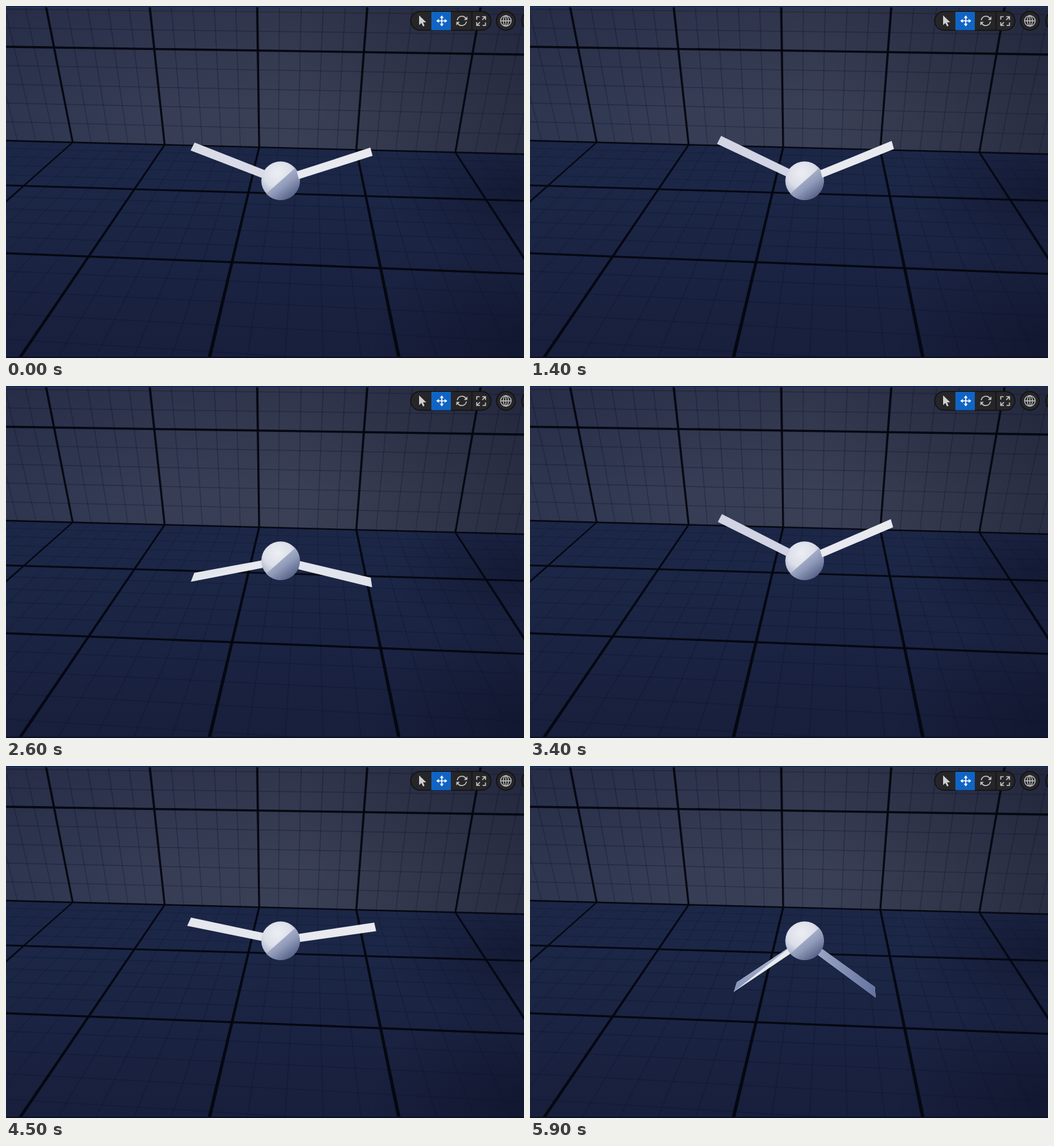
These frames come from a looping animation (800 by 544 pixels, 6 s). An HTML page:

```html
<!DOCTYPE html>
<html lang="en">
<head>
<meta charset="utf-8">
<title>Flapping wings</title>
<style>
html, body { margin: 0; width: 100%; height: 100%; overflow: hidden; background: #171e3c; }
svg { display: block; width: 800px; height: 544px; }
</style>
</head>
<body>
<svg viewBox="0 0 800 544" xmlns="http://www.w3.org/2000/svg">
  <defs>
    <linearGradient id="wall">
      <stop offset="0" stop-color="#2e354f"/><stop offset=".3" stop-color="#363d55"/>
      <stop offset=".55" stop-color="#3a4055"/><stop offset=".8" stop-color="#31364b"/>
      <stop offset="1" stop-color="#292e43"/>
    </linearGradient>
    <linearGradient id="wallShade" x2="0" y2="1">
      <stop offset="0" stop-color="#10142c" stop-opacity=".25"/><stop offset=".7" stop-color="#10142c" stop-opacity="0"/>
    </linearGradient>
    <linearGradient id="floor" x2="0" y2="1">
      <stop offset="0" stop-color="#1b2544"/><stop offset=".5" stop-color="#1c2747"/>
      <stop offset="1" stop-color="#181f3c"/>
    </linearGradient>
    <radialGradient id="gloom">
      <stop offset="0" stop-color="#0d1026" stop-opacity=".55"/><stop offset="1" stop-color="#0d1026" stop-opacity="0"/>
    </radialGradient>
    <radialGradient id="ball" cx=".42" cy=".3" r=".72">
      <stop offset="0" stop-color="#eceef3"/><stop offset=".5" stop-color="#dcdfe9"/>
      <stop offset=".8" stop-color="#b4bbd0"/><stop offset="1" stop-color="#747f9f"/>
    </radialGradient>
    <linearGradient id="shade" x1=".2" y1=".3" x2=".7" y2=".95">
      <stop offset="0" stop-color="#b4bcd2"/><stop offset=".5" stop-color="#8e99b8"/>
      <stop offset="1" stop-color="#566287"/>
    </linearGradient>
    <linearGradient id="duskLeft">
      <stop offset="0" stop-color="#8795ba"/><stop offset="1" stop-color="#b4bdd4"/>
    </linearGradient>
    <linearGradient id="duskRight">
      <stop offset="0" stop-color="#9aa6c6"/><stop offset="1" stop-color="#64739f"/>
    </linearGradient>
  </defs>
  <rect width="800" height="544" fill="url(#floor)"/>
  <ellipse cx="790" cy="285" rx="200" ry="115" fill="url(#gloom)"/>
  <ellipse cx="800" cy="520" rx="240" ry="170" fill="url(#gloom)"/>
  <path d="M0 0H800V229L0 208Z" fill="url(#wall)"/>
  <path d="M0 0H800V229L0 208Z" fill="url(#wallShade)"/>
  <g id="grid"></g>
  <path d="M0 .5H800" stroke="#111c36"/>
  <path d="M0 1.5H800" stroke="#17396a"/>
  <path d="M0 543H800" stroke="#0b1024" stroke-width="2"/>
  <g id="behind"></g>
  <g>
    <circle cx="424" cy="270" r="29.7" fill="url(#ball)"/>
    <path d="M402 290L446.5 250.5A29.7 29.7 0 0 1 402 290Z" fill="url(#shade)"/>
  </g>
  <g id="front"></g>
  <g id="toolbar" fill="none" stroke="#c4c4c6" stroke-width="1.6">
    <rect x="625" y="8.5" width="124" height="29" rx="14.5" fill="#262628" stroke="#101114" stroke-width="1.5"/>
    <path d="M719.5 9V37" stroke="#141416"/>
    <rect x="657" y="9" width="30" height="28.5" fill="#1065c4" stroke="none"/>
    <path d="M638 14.5V29.5L641.6 26.3L644 31.5L646.4 30.4L644.1 25.3H649Z" fill="#d0d0d2" stroke="none"/>
    <g stroke="#fff">
      <path d="M673 17V29M667 23H679"/>
      <path d="M673 14.5L676 18.5H670ZM673 31.5L676 27.5H670ZM664.5 23L668.5 20V26ZM681.5 23L677.5 20V26Z" fill="#fff" stroke="none"/>
    </g>
    <path d="M697 22A7.2 7.2 0 0 1 710 18.8M711 24A7.2 7.2 0 0 1 698 27.2"/>
    <path d="M712.5 16V21.5H707ZM695.5 30V24.5H701Z" fill="#c4c4c6" stroke="none"/>
    <path d="M735.5 21.5L740 17M735.5 16.5H740.5V21.5M732 25L727.5 29.5M732 30H727V25M727 21V16.5H731.5M740.5 25.5V30H736"/>
    <circle cx="772" cy="23" r="14.5" fill="#262628" stroke="#101114"/>
    <g stroke-width="1.3">
      <circle cx="772" cy="23" r="8.2"/><ellipse cx="772" cy="23" rx="3.9" ry="8.2"/>
      <path d="M764 23H780M772 15V31"/>
    </g>
    <circle cx="811" cy="23" r="14.5" fill="#262628" stroke="#101114"/>
  </g>
</svg>
<script>
const byId = id => document.getElementById(id);
const lerp = (a, b, t) => a + (b - a) * t;
const clamp = (v, lo, hi) => Math.min(hi, Math.max(lo, v));
const poly = (points, fill, opacity = 1) =>
  `<polygon points="${points.map(p => p.map(v => v.toFixed(2)).join()).join(' ')}" fill="${fill}" opacity="${opacity}"/>`;

// Room grid: main lines at whole steps, faint lines at every fifth of a step.
const wallTop = [62, 222, 388, 558, 733];
const wallFoot = [103, 245, 391, 541, 694];
function along(list, i) {
  const k = clamp(Math.floor(i), 0, list.length - 2);
  return lerp(list[k], list[k + 1], i - k);
}
const seamY = x => 208 + x * 21 / 800;
const rowLeft = k => 1 / (.002959 - .000503 * k) - 130;
const rowRight = k => 1 / (.003067 - .000555 * k) - 97;

function strip(x1, y1, x2, y2, w1, w2, main) {
  const upright = Math.abs(y2 - y1) > Math.abs(x2 - x1) * .5;
  const [dx, dy] = upright ? [.5, 0] : [0, .5];
  return poly([[x1 - w1 * dx, y1 - w1 * dy], [x1 + w1 * dx, y1 + w1 * dy],
    [x2 + w2 * dx, y2 + w2 * dy], [x2 - w2 * dx, y2 - w2 * dy]],
    main ? '#05070f' : '#10162f', main ? .95 : .36);
}

function drawGrid() {
  const faint = [], bold = [];
  const add = (main, ...line) => (main ? bold : faint).push(strip(...line, main));
  for (let n = -15; n <= 35; n++) {
    const i = n / 5, main = n % 5 === 0;
    const foot = along(wallFoot, i), footY = seamY(foot);
    add(main, along(wallTop, i), 2, foot, footY, main ? 3.6 : 1.6, main ? 3 : 1.2);
    add(main, foot, footY, 314 + 293 * (i - 2), 544, main ? 3.2 : 1.2, main ? 5.6 : 2);
  }
  for (let n = -2; n <= 5; n++) {
    const main = n % 5 === 0, w = main ? (n ? 2.4 : 3.4) : 1.4;
    add(main, 0, lerp(63, 208, n / 5), 800, lerp(75, 229, n / 5), w, w);
  }
  for (let n = 1; n < 15; n++) {
    const main = n % 5 === 0, w = main ? 2.4 + n * .08 : 1.1 + n * .05;
    add(main, 0, rowLeft(n / 5), 800, rowRight(n / 5), w, w);
  }
  byId('grid').innerHTML = faint.join('') + bold.join('');
}

// The wings rest until 500 ms, then beat about once a second. Zero degrees is the top of a beat.
const restPhase = 46;
const phaseAt = ms => ms < 500 ? restPhase : 35 + (ms - 1400) * .3582;
const liftAt = ms => -.106 + .86 * Math.cos(phaseAt(ms) * Math.PI / 180);

const grey = (r, g, b) => `rgb(${[r, g, b].map(Math.round).join()})`;

function wing(s, left) {
  const rise = 5 + 96 * s + 5 * (s * s - s ** 3) - (left ? 0 : 8);
  const reach = left ? 142.1 + 6.4 * s - 38.9 * s * s : 147.1 + 7 * s - 41.8 * s * s;
  const dx = left ? -reach : reach;
  const edge = left ? [2.8 + .6 * s, -6.6 + .9 * s] : [-1.3 - .8 * s, -7 + 1.2 * s];
  const point = (r, side, scale) =>
    [424 + dx * r + side * edge[0] * scale, 270 - rise * r + side * edge[1] * scale];
  const tipBack = point(1, 1, 1), tipFront = point(1, -1, 1);
  const rootBack = point(.19, 1, .92), rootFront = point(.19, -1, .92);
  const dim = left ? clamp((s - .2) * 52, 0, 28) : 0;
  const body = poly([tipBack, tipFront, rootFront, rootBack], grey(232 - dim, 234 - dim, 240 - dim * .6));
  const dusk = clamp((-s - .3) / .45, 0, 1);
  const shadow = left ? [tipBack, tipFront, rootBack] : [tipBack, tipFront, rootFront, rootBack];
  return body + (dusk ? poly(shadow, left ? 'url(#duskLeft)' : 'url(#duskRight)', dusk) : '');
}

function draw(ms) {
  const s = liftAt(ms);
  const wings = wing(s, true) + wing(s, false);
  byId('behind').innerHTML = s < .3 ? wings : '';
  byId('front').innerHTML = s < .3 ? '' : wings;
}

drawGrid();
const start = performance.now();
function tick() {
  const ms = (performance.now() - start) % 6000;
  draw(Math.floor(ms / 100) * 100);
  requestAnimationFrame(tick);
}
tick();
</script>
</body>
</html>
```
